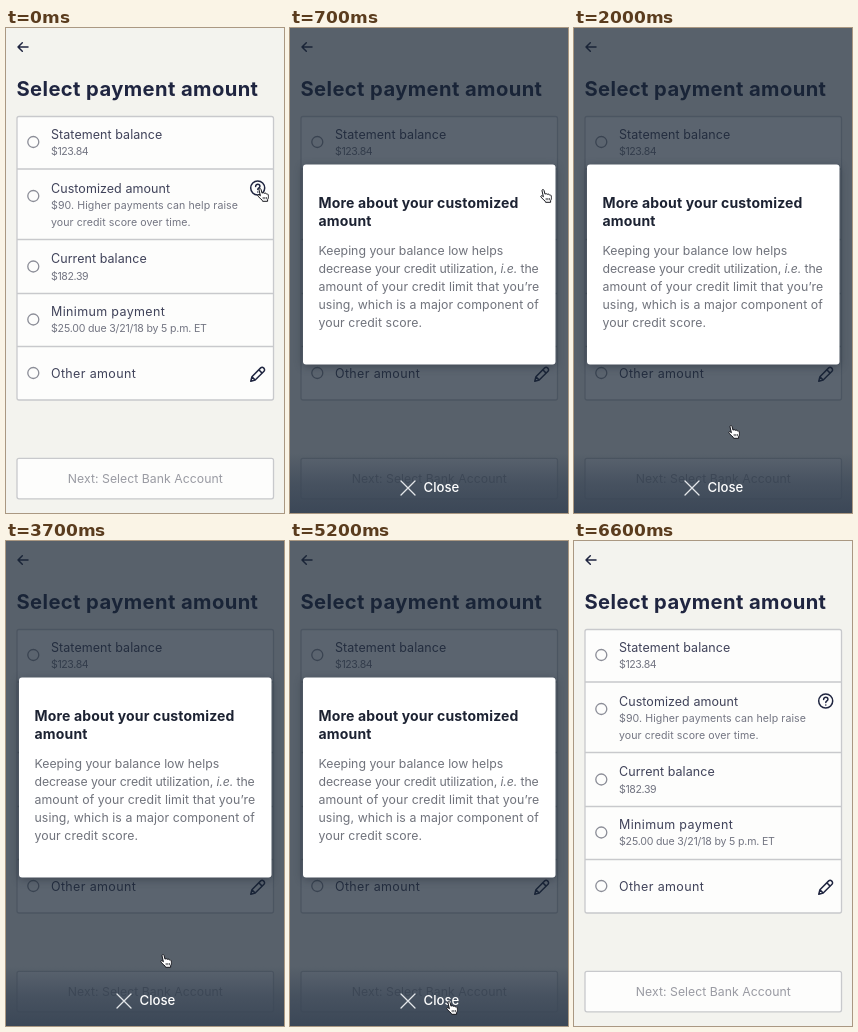
Write an HTML page that moves like this. It is 278 px wide and 485 px high and loops after 6.8 s.

```html
<!DOCTYPE html>
<html lang="en">
<head>
<meta charset="utf-8">
<title>Select payment amount</title>
<style>
  html, body { margin: 0; width: 100%; height: 100%; overflow: hidden; background: #f3f3ee; }
  svg { display: block; width: 100vw; height: 100vh; font-family: Inter, "Open Sans", sans-serif; }

  .title { font-size: 20.2px; font-weight: 700; letter-spacing: .4px; fill: #1f2540; }
  .label { font-size: 12.5px; letter-spacing: .06px; fill: #40435a; }
  .label .wide { letter-spacing: .35px; }
  .note { font-size: 10.6px; letter-spacing: .08px; fill: #737582; }
  .note .price { letter-spacing: -.4px; }
  .note .due { letter-spacing: -.19px; }
  .next { font-size: 12.25px; letter-spacing: .03px; fill: #9a9ba3; }
  .heading { font-size: 14px; font-weight: 700; letter-spacing: .17px; fill: #1c2232; }
  .body { font-size: 12.3px; fill: #70737c; }
  .body .wide { letter-spacing: .09px; }
  .body .tight { letter-spacing: -.12px; }
  .close { font-size: 13.2px; font-weight: 500; fill: #fff; }

  .box { fill: #fdfdfc; stroke: #c8c9cc; stroke-width: 1.3; }
  .rule { fill: none; stroke: #c8c9cc; stroke-width: 1.3; }
  .radio { fill: none; stroke: #8b8d97; stroke-width: 1.3; }
  .icon { fill: none; stroke: #1f2540; stroke-width: 1.5; stroke-linecap: round; stroke-linejoin: round; }
  .panel { fill: #fff; filter: drop-shadow(0 2px 4px rgba(20, 28, 40, .4)); }

  .modal { visibility: hidden; animation: modal 6.8s step-end infinite; }
  .cursor { animation: cursor 6.8s step-end infinite; }

  @keyframes modal {
    0% { visibility: hidden; }
    10.29% { visibility: visible; }
    80.88% { visibility: hidden; }
  }
  @keyframes cursor {
    0% { transform: translate(257px, 167px); }
    10.29% { transform: translate(256px, 168px); }
    20.58% { transform: translate(240px, 212px); }
    22.05% { transform: translate(202px, 312px); }
    23.52% { transform: translate(177px, 366px); }
    26.47% { transform: translate(169px, 385px); }
    27.94% { transform: translate(162px, 400px); }
    29.41% { transform: translate(160px, 404px); }
    54.41% { transform: translate(160px, 420px); }
    55.88% { transform: translate(161px, 444px); }
    57.35% { transform: translate(162px, 459px); }
    58.82% { transform: translate(162px, 467px); }
    80.88% { transform: translate(163px, 468px); opacity: 1; }
    86.76%, 100% { transform: translate(163px, 468px); opacity: 0; }
  }
</style>
</head>
<body>
<svg viewBox="0 0 278 485" preserveAspectRatio="none">
  <defs>
    <linearGradient id="fade" x1="0" y1="0" x2="0" y2="1">
      <stop offset="0" stop-color="#3a4656" stop-opacity="0"/>
      <stop offset=".5" stop-color="#3a4656" stop-opacity=".6"/>
      <stop offset="1" stop-color="#3a4656" stop-opacity=".95"/>
    </linearGradient>
  </defs>

  <rect width="278" height="485" fill="#f3f3ee"/>
  <path class="icon" d="M22 19H12M16.3 14.7 12 19l4.3 4.3"/>
  <text class="title" x="10.5" y="68">Select payment amount</text>

  <rect class="box" x="11" y="88.5" width="256.5" height="283.5" rx="2"/>
  <path class="rule" d="M11 141H267.5M11 211.5H267.5M11 265.5H267.5M11 318.5H267.5"/>
  <g class="radio">
    <circle cx="27.3" cy="114" r="5.5"/>
    <circle cx="27.3" cy="168" r="5.5"/>
    <circle cx="27.3" cy="238.5" r="5.5"/>
    <circle cx="27.3" cy="291.5" r="5.5"/>
    <circle cx="27.3" cy="345" r="5.5"/>
  </g>
  <g class="label">
    <text x="45" y="110.5">Statement balance</text>
    <text x="45" y="164.5">Customized amount</text>
    <text x="45" y="235">Current balance</text>
    <text class="wide" x="45" y="288">Minimum payment</text>
    <text class="wide" x="45" y="350">Other amount</text>
  </g>
  <g class="note">
    <text class="price" x="45" y="127">$123.84</text>
    <text x="45" y="181">$90. Higher payments can help raise</text>
    <text x="45" y="197.5">your credit score over time.</text>
    <text class="price" x="45" y="251.5">$182.39</text>
    <text class="due" x="45" y="304">$25.00 due 3/21/18 by 5 p.m. ET</text>
  </g>
  <g class="icon">
    <circle cx="251.7" cy="160" r="7"/>
    <path d="M249.6 158.4c0-2.8 4.3-2.7 4.3 0 0 1.6-2.1 1.5-2.1 3.2M251.8 163.9v.1"/>
    <path d="M244.8 353.2l1.1-4.5 8.8-8.8c1.9-1.9 5.2 1.4 3.3 3.3l-8.8 8.8zM252.8 341.8l3.3 3.3M245.9 348.7l3.3 3.3"/>
  </g>

  <rect class="box" x="11" y="430.3" width="256.5" height="40.5" rx="2"/>
  <text class="next" x="139.3" y="455" text-anchor="middle">Next: Select Bank Account</text>

  <g class="modal">
    <rect width="278" height="485" fill="#182434" fill-opacity=".7"/>
    <rect y="425" width="278" height="60" fill="url(#fade)"/>
    <rect class="panel" x="13" y="136.5" width="252.5" height="200" rx="3"/>
    <g class="heading">
      <text x="28.5" y="180">More about your customized</text>
      <text x="28.5" y="198">amount</text>
    </g>
    <g class="body">
      <text x="28.5" y="227">Keeping your balance low helps</text>
      <text class="tight" x="28.5" y="245">decrease your credit utilization, <tspan font-style="italic">i.e.</tspan> the</text>
      <text class="wide" x="28.5" y="263">amount of your credit limit that you’re</text>
      <text class="wide" x="28.5" y="281">using, which is a major component of</text>
      <text class="wide" x="28.5" y="299">your credit score.</text>
    </g>
    <path d="M111 453l14 14M125 453l-14 14" fill="none" stroke="#e4e7ea" stroke-width="1.3" stroke-linecap="round"/>
    <text class="close" x="133.5" y="464">Close</text>
  </g>

  <g class="cursor">
    <path fill="#fff" stroke="#15161c" stroke-linejoin="round" d="M-4-5.2C-4.2-6.8-2.2-7-1.9-5.4L-1-1.8C-.2-2.7 1-2.4 1.2-1.6C2-2.3 3.1-1.9 3.3-1C4.3-1.4 5.2-.8 5.3.2C5.6 2.2 5.4 3.5 4.6 4.6V6.3H-.4L-.8 5.2C-2.2 4-3.6 2.6-5 1.2C-5.8.2-4.6-.8-3.6 0L-2.6.8Z"/>
    <path fill="none" stroke="#15161c" stroke-width=".7" d="M.2 2v2.2M1.8 2v2.2M3.4 2v2.2"/>
  </g>
</svg>
</body>
</html>
```
